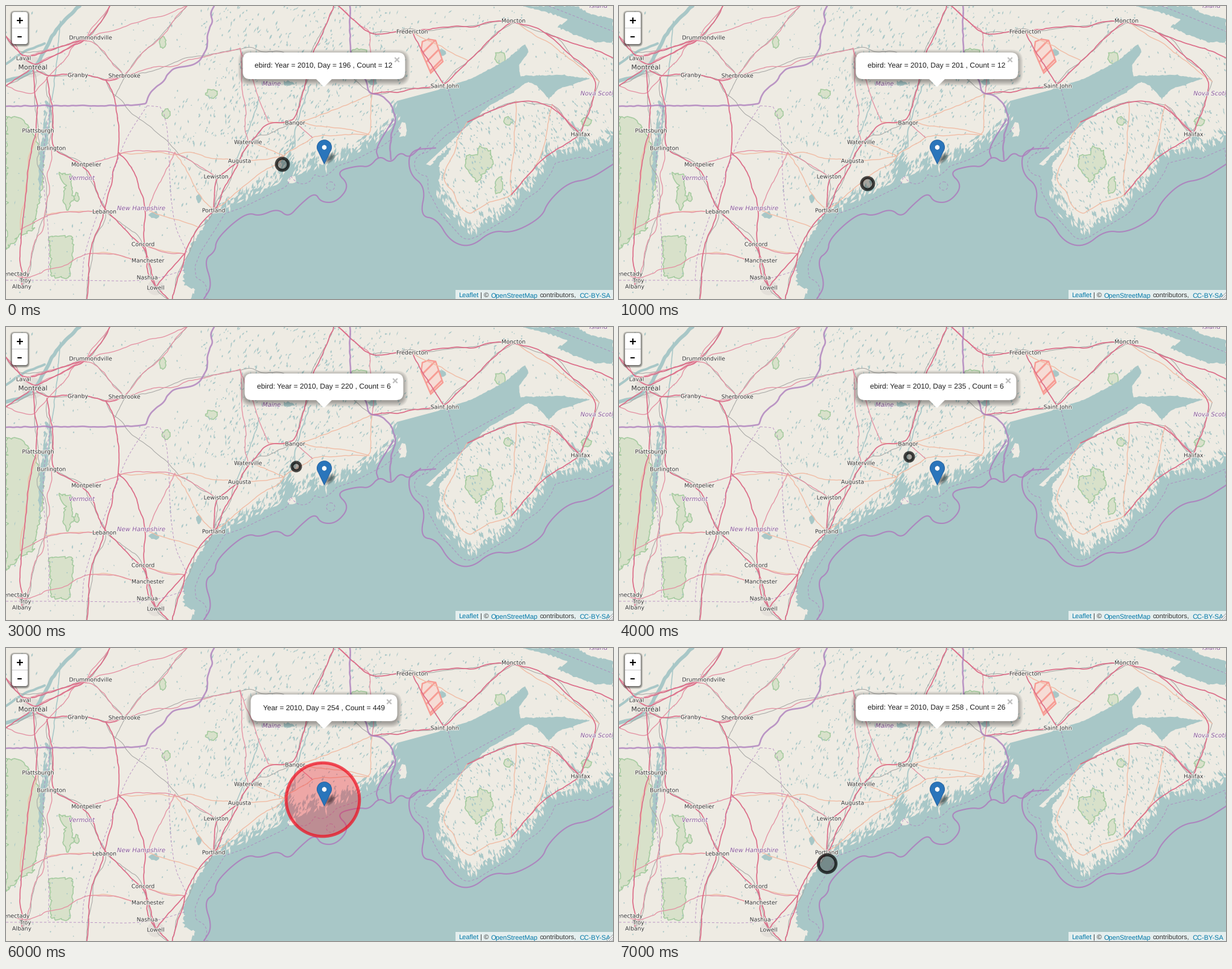
Write a matplotlib script that moves like this. It is 1006 by 485 pixels and loops after 8000 ms.

```python
import numpy as np
import matplotlib.pyplot as plt
from matplotlib.animation import ArtistAnimation
from matplotlib.collections import PolyCollection
from matplotlib.patches import Circle, Ellipse, FancyBboxPatch, Polygon, Rectangle
from matplotlib.path import Path
from matplotlib.patheffects import withStroke

W, H, DPI = 1006, 485, 64
PT = 72 / DPI  # points per pixel
LAND, WATER = "#eeebe3", "#a8c7c7"
TRUNK, PRIMARY, MINOR, RAIL = "#dc6c88", "#e490a2", "#f1bda6", "#a5a5a3"
PURPLE, RED = "#ad7fbd", "#f00a1c"
SANS = {"family": "Liberation Sans"}

rng = np.random.default_rng(7)
plt.rcParams.update({"text.hinting": "none", "hatch.linewidth": 3.2})
fig = plt.figure(figsize=(W / DPI, H / DPI), dpi=DPI, facecolor=LAND)
ax = fig.add_axes([0, 0, 1, 1])
ax.set(xlim=(0, W), ylim=(H, 0))
ax.axis("off")


def pairs(*values):
    return np.array(values, float).reshape(-1, 2)


def smooth(p, rounds=2):
    """Cut the corners of an open polyline."""
    for _ in range(rounds):
        a, b = p[:-1], p[1:]
        mid = np.stack([.75 * a + .25 * b, .25 * a + .75 * b], 1).reshape(-1, 2)
        p = np.vstack([p[:1], mid, p[-1:]])
    return p


def rough(p, amp, step=3):
    """Resample a polyline evenly and jitter it."""
    d = np.r_[0, np.cumsum(np.hypot(*np.diff(p, axis=0).T))]
    t = np.linspace(0, d[-1], max(3, int(d[-1] / step)))
    q = np.stack([np.interp(t, d, p[:, 0]), np.interp(t, d, p[:, 1])], 1)
    q[1:-1] += rng.normal(0, amp, (len(q) - 2, 2))
    return q


def stroke(p, color, width, z, dash=None, alpha=1):
    ax.plot(*p.T, color=color, lw=width * PT, ls=(0, dash) if dash else "-",
            zorder=z, alpha=alpha, solid_capstyle="round", dash_capstyle="butt")


def area(color, p, amp=1, z=2, edge="none", width=0):
    p = rough(np.vstack([p, p[:1]]), amp)
    ax.add_patch(Polygon(p, fc=color, ec=edge, lw=width * PT, zorder=z))


def blob(x, y, w, h):
    """Uneven closed outline around a centre."""
    a = np.linspace(0, 2 * np.pi, 8)[:-1] + .4
    r = rng.uniform(.42, .6, 7)
    return np.stack([x + w * r * np.cos(a), y + h * r * np.sin(a)], 1)


def park(p, amp=1.2):
    area("#d8e1ca", p, amp, 1.5, "#a5cba0", 1.6)


def spears(centres, length, width, tilt, color, z):
    """Thin slanted kites: lakes, inlets and islets."""
    n = len(centres)
    a = np.radians(tilt) + rng.normal(0, .3, n)
    u = np.stack([np.cos(a), np.sin(a)], 1)
    v = u[:, ::-1] * [-1, 1]
    half = u * rng.uniform(.25, .6, n)[:, None] * length
    side = v * rng.uniform(.25, .6, n)[:, None] * width
    kites = np.stack([centres - half, centres + side, centres + half * .9,
                      centres - side * .8], 1)
    ax.add_collection(PolyCollection(kites, fc=color, ec="none", zorder=z))


def text(x, y, s, px, color="#333333", z=6, halo=0, **kw):
    if halo:
        kw["path_effects"] = [withStroke(linewidth=halo * PT, foreground="#f6f4ef")]
    return ax.text(x, y, s, fontsize=px * PT, color=color, zorder=z, **kw)


# Coast and sea
MAINE = pairs(
    306, 485, 314, 470, 297, 462, 294, 428, 306, 398, 332, 358, 350, 328, 385, 316,
    410, 304, 452, 284, 459, 245, 474, 233, 480, 260, 492, 276, 505, 252, 524, 264,
    537, 249, 570, 238, 620, 212, 644, 184, 636, 168, 645, 158)
FUNDY = pairs(
    712, 140, 775, 119, 827, 91, 860, 63, 867, 76, 850, 98, 852, 116, 920, 114,
    968, 120, 915, 138, 900, 154, 880, 132, 866, 125, 840, 143, 800, 166, 748, 214)
SCOTIA = pairs(
    696, 262, 701, 265, 744, 226, 718, 262, 718, 300, 735, 332, 767, 368, 793, 352,
    834, 328, 842, 310, 872, 290, 890, 262, 892, 245, 945, 232, 953, 216, 960, 234,
    1006, 214)
coast = np.vstack([rough(MAINE, 1.7), rough(FUNDY, .5), rough(SCOTIA, 1.3)])
sea = np.vstack([coast, [(W, H)]])
ax.add_patch(Polygon(sea, fc=WATER, zorder=2))
area(WATER, pairs(858, 0, 895, 10, 932, 22, 914, 35, 975, 60, 1006, 60, 1006, 22,
                  970, 14, 943, 0), .8)
area(LAND, blob(658, 205, 14, 24), z=2.5)
area(LAND, blob(474, 288, 14, 14), z=2.5)

downeast, south = rough(MAINE[6:], 3, 2), rough(SCOTIA[4:], 2.5, 2)
for shore, n, tilt in ((downeast, 130, 118), (south, 110, 72)):
    for color, dy in ((WATER, -4), (LAND, 4)):
        spots = shore[rng.integers(0, len(shore), n)] + rng.normal(0, 2.5, (n, 2))
        spears(spots + [0, dy], 15, 4, tilt, color, 2.4)

# Lakes and rivers
sea_path = Path(sea)
for low, high, n, tilt, size in (
        ((0, 0), (330, 480), 190, 100, 4), ((320, 0), (630, 235), 620, 112, 6),
        ((270, 150), (470, 330), 170, 105, 6), ((600, 0), (870, 140), 150, 120, 5),
        ((715, 160), (1006, 345), 600, 68, 6), ((870, 60), (1006, 200), 60, 70, 4)):
    c = rng.uniform(low, high, (n, 2))
    c = c[~sea_path.contains_points(c)]
    spears(c, size * rng.uniform(.5, 1.7, (len(c), 1)), 2.6, tilt, WATER, 2.2)

area(WATER, pairs(66, 156, 76, 165, 71, 220, 62, 262, 56, 325, 54, 270, 60, 212))
spears(rng.normal((68, 185), (3, 14), (12, 2)), 16, 4, 95, LAND, 2.4)
for x, y, w, h in ((246, 346, 18, 12), (319, 318, 9, 16), (444, 100, 9, 30),
                   (468, 128, 20, 9), (718, 77, 26, 12), (608, 125, 14, 14)):
    area(WATER, blob(x, y, w, h))
for width, *course in (
        (6, 0, 124, 42, 112, 62, 78, 84, 36, 122, 0), (4, 0, 96, 26, 76, 64, 62),
        (1.6, 90, 25, 84, 100, 76, 156), (1.8, 478, 236, 480, 194, 505, 130),
        (1.5, 380, 260, 408, 190, 420, 150), (3, 938, 192, 953, 217)):
    stroke(smooth(rough(smooth(pairs(*course)), .5, 6), 1), WATER, width, 2.3)

# Parks
park(pairs(0, 183, 25, 184, 46, 212, 61, 245, 60, 295, 45, 370, 24, 378, 0, 402), 1.6)
park(pairs(72, 382, 110, 380, 112, 402, 104, 450, 74, 448))
park(pairs(88, 275, 106, 279, 112, 318, 102, 338, 95, 325, 98, 300))
park(pairs(763, 248, 781, 246, 783, 231, 803, 240, 807, 266, 795, 272, 781, 293, 760, 264))
for x, y, w, h in ((817, 297, 14, 27), (819, 86, 17, 20), (832, 190, 15, 14),
                   (962, 192, 17, 14), (585, 78, 26, 12), (341, 145, 22, 15),
                   (260, 60, 13, 20), (266, 178, 13, 15), (117, 317, 9, 14)):
    park(blob(x, y, w, h), .8)
ax.add_patch(Polygon(pairs(690, 59, 700, 55, 712, 57, 724, 92, 704, 111, 688, 74),
                     fc="#f6dcd5", ec="#f79c94", hatch="/", lw=2.4 * PT, zorder=3))

# Places; unlabelled junctions carry the road network
towns = {
    "Drummondville": (140, 52), "Laval": (29, 86), "Montréal": (44.5, 101),
    "Granby": (119, 114), "Sherbrooke": (196, 115), "Plattsburgh": (53, 206),
    "Burlington": (75, 235), "Montpelier": (133, 262), "Lebanon": (163, 340),
    "Concord": (227, 394), "Manchester": (235, 421), "Nashua": (234, 449),
    "Lowell": (248, 466), "Schenectady": (9, 443), "Troy": (32, 454),
    "Albany": (26, 464), "Waterville": (401, 225), "Augusta": (387, 256),
    "Lewiston": (348, 282), "Portland": (344, 338), "Bangor": (479, 193),
    "Fredericton": (673, 42), "Moncton": (841, 24), "Saint John": (727, 132),
    "Halifax": (952, 212)}
junctions = {
    "Quebec": (172, 0), "Ottawa": (0, 50), "Cornwall": (0, 132), "Thetford": (300, 0),
    "Champlain": (48, 150), "Lake": (42, 240), "Glens": (24, 370), "Magog": (165, 122),
    "Newport": (180, 150), "Caledonia": (187, 243), "Notch": (215, 285),
    "Plymouth": (235, 338), "Ascutney": (138, 410), "Greenfield": (133, 490),
    "Boston": (274, 490), "Portsmouth": (296, 410), "Wells": (318, 366),
    "Newburgh": (435, 192), "Medway": (508, 80), "Houlton": (545, -5),
    "Woodstock": (602, 46), "Calais": (607, 145), "Sussex": (765, 90),
    "Amherst": (895, 45), "Truro": (983, 125), "Windsor": (905, 163),
    "Aylesford": (845, 157), "Digby": (765, 192), "Yarmouth": (721, 290),
    "Shelburne": (765, 346), "Liverpool": (838, 312), "Chester": (884, 254),
    "Ellsworth": (508, 218), "Machias": (602, 213), "Belfast": (460, 248),
    "Jackman": (388, 70), "Rutland": (66, 345), "Isle": (78, 190),
    "Pugwash": (1006, 86), "Gorham": (280, 242), "Jean": (68, 118)}
nodes = towns | junctions


def roads(color, width, z, bend, *routes):
    """Winding lines through named places."""
    for route in routes:
        p = np.array([nodes[name] for name in route.split(",")], float)
        winding = smooth(rough(p, bend, 20), 2)
        stroke(smooth(rough(winding, .4, 5), 1), color, width, z)


roads(RAIL, 1, 3.5, 3.5,
      "Ottawa,Laval,Drummondville,Quebec", "Cornwall,Montréal,Jean,Granby,Magog",
      "Jean,Isle,Burlington,Montpelier,Lebanon,Ascutney,Greenfield",
      "Magog,Newport,Gorham,Lewiston,Portland", "Sherbrooke,Jackman,Medway,Calais",
      "Boston,Portsmouth,Wells,Portland,Augusta,Waterville,Bangor,Medway,Houlton",
      "Woodstock,Fredericton,Moncton", "Calais,Saint John,Sussex,Moncton,Amherst,Truro",
      "Truro,Halifax,Windsor,Aylesford,Digby", "Montréal,Champlain,Plattsburgh,Rutland",
      "Rutland,Albany", "Lebanon,Concord,Nashua,Boston", "Drummondville,Sherbrooke",
      "Thetford,Sherbrooke,Newport")
roads(MINOR, 1.4, 3.7, 3,
      "Portland,Belfast,Ellsworth,Machias,Calais", "Caledonia,Gorham,Augusta",
      "Gorham,Portland", "Bangor,Calais", "Waterville,Belfast", "Augusta,Belfast",
      "Concord,Portsmouth", "Rutland,Lebanon", "Ascutney,Manchester", "Plymouth,Wells",
      "Aylesford,Liverpool", "Digby,Yarmouth,Shelburne,Liverpool,Chester",
      "Windsor,Chester", "Fredericton,Sussex", "Moncton,Truro", "Plattsburgh,Lake,Glens",
      "Machias,Bangor,Newburgh")
roads(PRIMARY, 1.3, 3.9, 3,
      "Ottawa,Montréal,Drummondville,Sherbrooke", "Laval,Drummondville,Thetford",
      "Cornwall,Champlain,Jean,Quebec", "Sherbrooke,Thetford", "Magog,Jackman",
      "Burlington,Rutland,Troy", "Montpelier,Caledonia,Gorham,Lewiston",
      "Schenectady,Troy,Ascutney,Manchester", "Concord,Portsmouth", "Plymouth,Gorham",
      "Newburgh,Jackman", "Bangor,Ellsworth", "Houlton,Woodstock,Calais",
      "Waterville,Jackman", "Windsor,Halifax", "Glens,Rutland,Lebanon")
roads(TRUNK, 1.7, 4, 1.6,
      "Montréal,Jean,Granby,Magog,Sherbrooke", "Laval,Montréal,Drummondville,Quebec",
      "Ottawa,Laval,Drummondville", "Cornwall,Montréal",
      "Montréal,Champlain,Plattsburgh,Lake,Glens,Albany",
      "Jean,Isle,Burlington,Montpelier,Lebanon,Concord,Manchester,Lowell",
      "Magog,Newport,Caledonia,Lebanon,Ascutney,Greenfield",
      "Caledonia,Notch,Plymouth,Concord,Manchester,Nashua,Boston", "Lowell,Portsmouth",
      "Boston,Portsmouth,Wells,Portland,Augusta,Waterville,Newburgh,Bangor,Medway,Houlton",
      "Portland,Lewiston,Augusta",
      "Houlton,Woodstock,Fredericton,Moncton,Amherst,Truro,Halifax",
      "Calais,Saint John,Sussex,Moncton", "Fredericton,Saint John", "Amherst,Pugwash",
      "Digby,Aylesford,Windsor,Halifax", "Halifax,Chester,Liverpool")
for name, size in (("Montréal", 38), ("Lowell", 28), ("Troy", 20), ("Portland", 14)):
    ax.add_patch(Ellipse(nodes[name], size, size * .9, fc="#ddd7d3", alpha=.6, zorder=2.1))

# Borders
for p in (pairs(0, 166, 60, 165, 232, 165, 233, 156, 240, 140, 260, 127, 274, 102, 318, 99,
                336, 62, 332, 50, 343, 25, 338, 12, 345, 0),
          pairs(570, 0, 570, 95, 599, 122, 599, 146, 630, 148, 649, 187, 636, 215, 638, 254)):
    stroke(smooth(rough(smooth(p), .5, 6), 1), PURPLE, 2.6, 5, alpha=.8)
limits = (
    pairs(328, 485, 342, 462, 328, 420, 347, 406, 348, 388, 375, 360, 402, 342, 420, 348,
          450, 335, 468, 350, 486, 330, 512, 308, 522, 325, 548, 325, 570, 297, 546, 274,
          584, 264, 602, 267, 619, 247, 638, 261, 653, 241, 668, 252, 687, 234),
    pairs(617, 251, 612, 236, 642, 188),
    pairs(712, 235, 668, 238, 668, 278, 696, 300, 686, 348, 714, 352, 736, 390, 770, 400,
          806, 371, 840, 376, 888, 350, 898, 324, 932, 292, 967, 287, 1006, 262))
for p in limits:
    stroke(smooth(p, 3), PURPLE, 2.1, 5, alpha=.9)
for p in (pairs(234, 165, 200, 216, 184, 258, 130, 402, 126, 454),
          pairs(234, 165, 268, 168, 273, 350, 300, 408),
          pairs(0, 454, 126, 454, 235, 456, 296, 437),
          pairs(74, 165, 58, 260, 72, 380, 70, 452), pairs(733, 138, 752, 210),
          pairs(690, 245, 720, 200, 845, 132), pairs(900, 0, 1006, 42)):
    stroke(smooth(p), PURPLE, 1, 4.8, (4, 3), .75)
ax.add_patch(Circle((538, 298), 7, fill=False, ec=PURPLE, lw=PT, ls=(0, (4, 3)),
                    alpha=.75, zorder=4.8))

# Inner limit: a fixed distance from the open coast
gx, gy = np.meshgrid(np.arange(300, W + 4, 4), np.arange(200, H + 4, 4))
grid = np.stack([gx.ravel(), gy.ravel()], 1)
shore = np.vstack([rough(MAINE, 0, 8), rough(SCOTIA, 0, 8)])
gap = np.hypot(*(grid[:, None] - shore).transpose(2, 0, 1)).min(1)
gap[~sea_path.contains_points(grid)] = 0
ax.contour(gx, gy, gap.reshape(gx.shape), [19], colors=PURPLE, linewidths=PT,
           linestyles=[(0, (4, 3))], alpha=.75, zorder=4.8)

# Place names
for name, (x, y) in towns.items():
    big = name == "Montréal"
    text(x, y + (4 if big else 3.5), name, 11 if big else 9.3, halo=2, ha="center")
for x, y, name in ((425, 132, "Maine"), (104, 288, "Vermont"),
                   (184, 338, "New Hampshire"), (952, 148, "Nova Scotia"), (967, 3, "Island")):
    text(x, y, name, 10.1, "#8a5a9c", halo=1.6, style="italic", clip_on=True)


def rounded(x, y, w, h, r, color="white", alpha=1.0, z=9.0):
    return ax.add_patch(FancyBboxPatch(
        (x, y), w, h, boxstyle=f"round,pad=0,rounding_size={r}",
        fc=color, ec="none", alpha=alpha, zorder=z))


def shadow(x, y, w, h, r, spread, steps, alpha, z):
    return [rounded(x - g, y - g, w + 2 * g, h + 2 * g, r + g, "black", alpha, z)
            for g in np.linspace(spread, 0, steps)]


# Marker
for k in range(7):
    ax.add_patch(Ellipse((537, 252), 25 - 2.5 * k, 13 - 1.5 * k, angle=-45,
                         fc="black", alpha=.08, zorder=8))
t = np.linspace(-.6, np.pi + .6, 40)
head = np.stack([527.5 - 12 * np.cos(t), 233.8 - 12 * np.sin(t)], 1)
pin = np.vstack([[(527.5, 261.5), (522.5, 251)], head, [(532.5, 251)]])
ax.add_patch(Polygon(pin, fc="#2a75bb", ec="#22619f", lw=PT, zorder=8.2))
ax.add_patch(Circle((527.5, 234), 4.2, fc="white", ec="#2365a3", lw=.6 * PT, zorder=8.3))

# Zoom buttons
shadow(10, 11, 26, 53, 4, 3.5, 6, .11, 9.9)
rounded(10, 10, 26, 53, 4, z=10)
ax.add_patch(Rectangle((10, 36), 26, 1, fc="#cccccc", zorder=10.1))
for x, y, w, h in ((18, 22.8, 10, 2), (22, 18.8, 2, 10), (19.5, 50, 6.5, 2)):
    ax.add_patch(Rectangle((x, y), w, h, fc="black", zorder=10.2))

# Attribution
ax.add_patch(Rectangle((745, 470), 261, 15, fc="white", alpha=.7, zorder=10))
for x, s, color in ((750, "Leaflet", "#0078a8"), (786, "| ©", "#333333"),
                    (803.5, "OpenStreetMap", "#0078a8"), (885, "contributors,", "#333333"),
                    (950.5, "CC-BY-SA", "#0078a8")):
    text(x, 482.5, s, 11, color, z=10.1, **SANS)


def grip():
    parts = [ax.add_patch(Polygon(pairs(996, 485, 1006, 474, 1006, 485),
                                  fc="#f4f4f4", zorder=10.3))]
    for k in (0, 4, 8):
        parts += ax.plot([995.5 + k, 1006], [485, 474.5 + k], color="#8f9a9e",
                         lw=.8 * PT, zorder=10.4)
    return parts


def sighting(x, y, day, count, tagged=True, corner=True):
    """Circle sized by count, with its popup."""
    color, r = ("black" if tagged else RED), 2.87 * np.sqrt(count)
    parts = [ax.add_patch(Circle((x, y), r, fc=color, ec="none", alpha=.3, zorder=7)),
             ax.add_patch(Circle((x, y), r, fill=False, ec=color, alpha=.7,
                                 lw=5 * PT, zorder=7.1))]
    prefix = "ebird: " if tagged else ""
    label = text(526.5, 103, f"{prefix}Year = 2010, Day = {day} , Count = {count}",
                 12, "#1c1c1c", z=9.5, ha="center", **SANS)
    w = round(label.get_window_extent().width) + 41
    left = 527 - w / 2
    parts += shadow(left, 80, w, 44, 12, 8, 9, .04, 8.8)
    parts.append(rounded(left, 77, w, 44, 12))
    parts.append(ax.add_patch(Polygon(pairs(513.5, 120.5, 540.5, 120.5, 527, 134),
                                      fc="white", zorder=9)))
    cx = left + w - 13.5
    for s in (-1, 1):
        parts += ax.plot([cx - 3.7, cx + 3.7], [89 - 3.7 * s, 89 + 3.7 * s],
                         color="#bfbfbf", lw=2.2 * PT, zorder=9.5, solid_capstyle="butt")
    return parts + [label] + (grip() if corner else [])


scenes = [
    sighting(458, 262, 196, 12, corner=False),
    sighting(412, 294, 201, 12),
    sighting(367, 326, 206, 12),
    sighting(481, 231, 220, 6),
    sighting(481, 215, 235, 6),
    sighting(481, 199, 250, 5),
    sighting(525, 251, 254, 449, tagged=False),
    sighting(345, 357, 258, 26, corner=False),
]
anim = ArtistAnimation(fig, scenes, interval=1000, repeat=True, repeat_delay=0)
plt.show()
```
